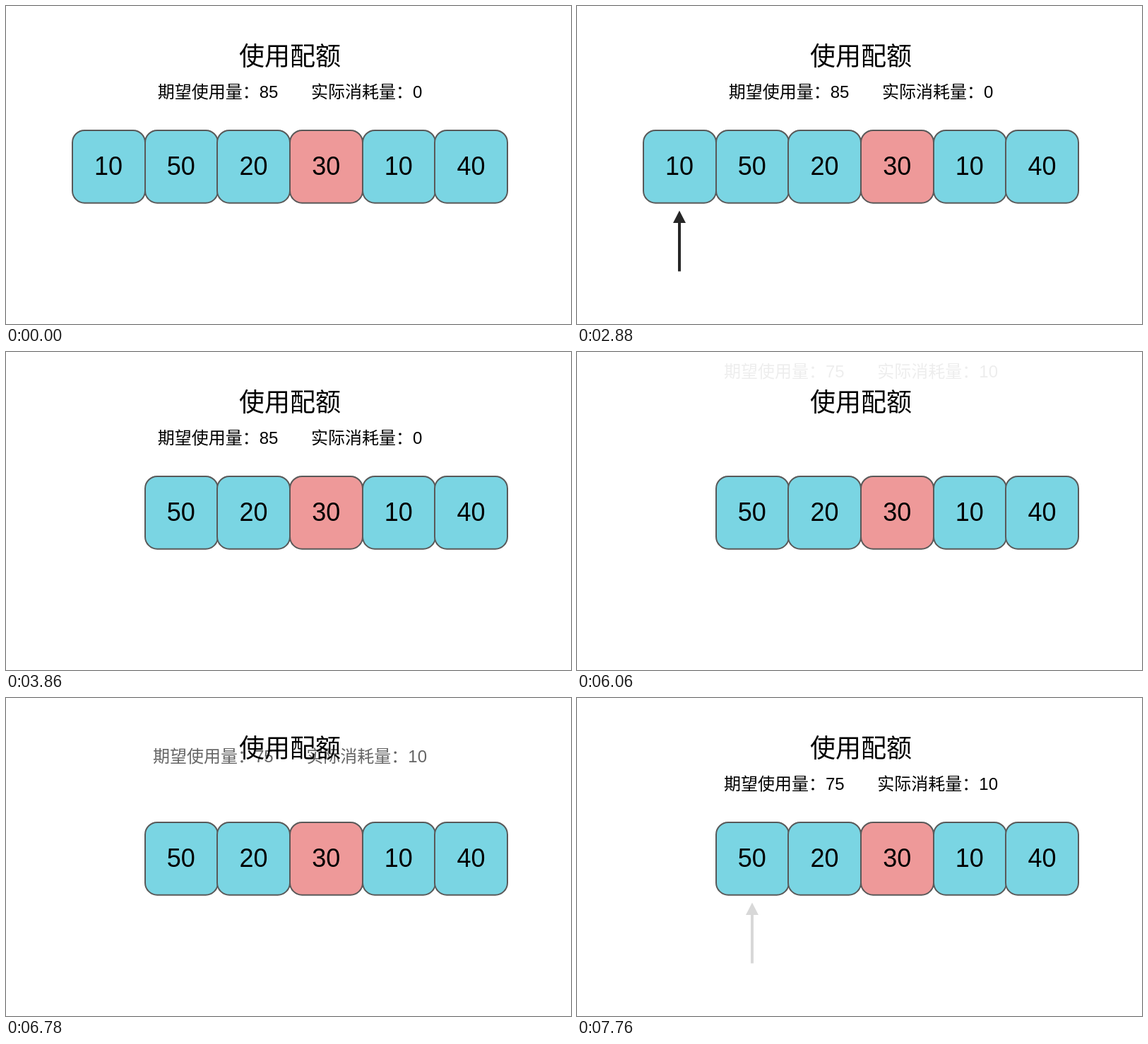
These frames come from a looping animation (800x450 px, 8 s). An HTML page:

```html
<!DOCTYPE html>
<html lang="zh-CN">
<head>
<meta charset="utf-8">
<title>使用配额</title>
<style>
  html, body { margin: 0; width: 100%; height: 100%; overflow: hidden; background: #fff; }
  svg { display: block; width: 800px; height: 450px; }
  text { font-family: "Liberation Sans", "Noto Sans CJK SC", "Noto Sans CJK", sans-serif; text-anchor: middle; white-space: pre; }
  .big { font-size: 36px; }
  .small { font-size: 24px; }
  rect { stroke: #595959; stroke-width: 2; }
</style>
</head>
<body>
<svg viewBox="0 0 800 450">
  <text id="usage" class="small" x="402" y="130"></text>
  <text class="big" x="402" y="84">使用配额</text>
  <g id="blocks"></g>
  <path id="arrow" d="M0 289.5L9 307H2V375.5H-2V307H-9Z"/>
</svg>
<script>
const LOOP = 8000, FIRST = 145.05, PITCH = 102.7;
const $ = id => document.getElementById(id);
const usage = $('usage'), arrow = $('arrow');

function make(tag, attrs, parent) {
  const el = document.createElementNS('http://www.w3.org/2000/svg', tag);
  for (const k in attrs) el.setAttribute(k, attrs[k]);
  return parent.appendChild(el);
}

const blocks = [10, 50, 20, 30, 10, 40].map((value, i) => {
  const g = make('g', {}, $('blocks')), cx = FIRST + i * PITCH;
  make('rect', { x: Math.round(cx - 51.1), y: 176, width: 103, height: 102.7, rx: 17.2,
    fill: value === 30 ? '#ee9999' : '#7ad5e3' }, g);
  make('text', { x: cx, y: 239, class: 'big' }, g).textContent = value;
  return g;
});

// Progress from 0 to 1 in equal jumps; the first jump is at `start`
function stepped(t, start, gap, total) {
  const n = Math.floor((t - start) / gap) + 1;
  return Math.min(Math.max(n, 0), total) / total;
}

const arrowFade = (t, start) => stepped(t, start, 218, 13);
const label = (want, used) => `期望使用量：${want}${'\u00a0'.repeat(7)}实际消耗量：${used}`;

function draw(t) {
  const first = t < 3220;
  arrow.setAttribute('opacity', first ? arrowFade(t, 500) : arrowFade(t, 7540));
  arrow.setAttribute('transform', `translate(${first ? 145 : 248} 0)`);

  const exit = stepped(t, 3320, 77, 8);
  blocks[0].setAttribute('transform', `translate(${-209 * exit} 0)`);

  // The new line drops in with a slight slowdown
  const drop = stepped(t, 6060, 90, 15);
  const eased = drop + 0.06 * drop * (1 - drop);
  const text = drop ? label(75, 10) : label(85, 0);
  if (usage.textContent !== text) usage.textContent = text;
  usage.setAttribute('y', drop ? 29 + 101 * eased : 130);
  usage.setAttribute('opacity', drop || 1);
}

const start = performance.now();
function tick() {
  draw((performance.now() - start) % LOOP);
  requestAnimationFrame(tick);
}
draw(0);
requestAnimationFrame(tick);
</script>
</body>
</html>
```
